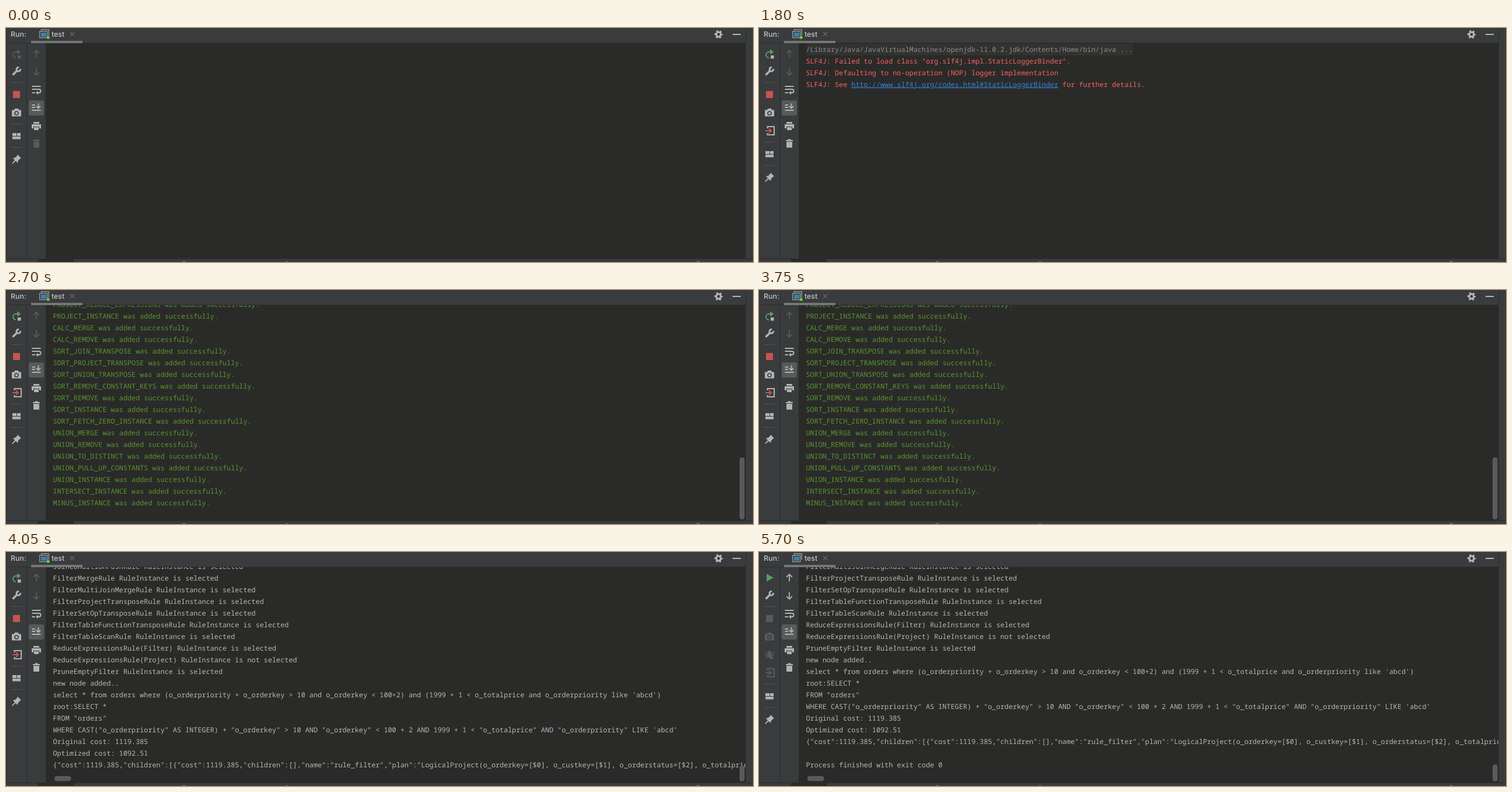
These frames come from a looping animation (1280x401 px, 6 s). An HTML page:

```html
<!DOCTYPE html>
<html lang="en">
<head>
<meta charset="utf-8">
<title>Run console</title>
<style>
  html, body { margin: 0; width: 100%; height: 100%; overflow: hidden; background: #2a2b29; }
  svg { display: block; width: 1280px; height: 401px; }
  text { text-rendering: geometricPrecision; }
  .ui { font: 500 12.4px Inter, "Open Sans", sans-serif; fill: #c3c4c4; }
  .log { font: 11.827px "Noto Sans Mono", "DejaVu Sans Mono", monospace; }
</style>
</head>
<body>
<svg viewBox="0 0 1280 401" xmlns="http://www.w3.org/2000/svg">
  <defs><clipPath id="view"><rect x="69" y="26" width="1198" height="369"/></clipPath></defs>
  <rect width="1280" height="401" fill="#2a2b29"/>
  <rect width="1280" height="25" fill="#393b3c"/>
  <rect y="26" width="68" height="369" fill="#393b3c"/>
  <rect x="1268" width="12" height="401" fill="#393b3c"/>
  <path d="M0 25.5H1267M35.5 26V395M1267.5 0V395M1 0V395" stroke="#2d2f2f" fill="none"/>
  <rect y="395" width="1280" height="6" fill="#393b3c"/>
  <path d="M0 395.5H1280" stroke="#2b2c2c"/>
  <rect x="55" y="396" width="61" height="5" fill="#292b2b"/>
  <path d="M302 401q3-2 6 0M479 401q2.500-1 5 0M1183 401q3-2 6 0" stroke="#8c8e8f" fill="none"/>
  <text class="ui" x="8" y="15.300">Run:</text>
  <text class="ui" x="78" y="15.300">test</text>
  <path d="M110 7l7 7m0-7l-7 7" stroke="#696c6d" stroke-width="1.200"/>
  <rect x="43" y="22" width="88" height="4" fill="#747778"/>
  <g fill="none" stroke="#92989b" stroke-width="1.400">
    <path d="M60.500 5V2.700H73.300V13"/>
    <rect x="57.700" y="5.700" width="13" height="11"/>
  </g>
  <rect x="60" y="8" width="9" height="7" fill="#3c82a4"/>
  <circle id="dot" cx="72.300" cy="16.300" r="2.500" fill="#5bd63d"/>
  <g transform="translate(1221 11)" fill="none" stroke="#b4b6b7">
    <circle r="3.900" stroke-width="3"/>
    <circle r="6" stroke-width="2.400" stroke-dasharray="3.142" stroke-dashoffset="1.570"/>
  </g>
  <path d="M1245 11H1259" stroke="#b4b6b7" stroke-width="2"/>
  <g id="tools"></g>
  <g id="console" clip-path="url(#view)"></g>
</svg>
<script>
const LOOP = 6000;
const C = {
  bar: '#393b3c', icon: '#b1b3b4', dim: '#585b5c', line: '#505354', thumb: '#595a59',
  red: '#c75450', green: '#599e5e', text: '#b5b6b5', error: '#f3625f', ok: '#5a932f', fold: '#8b8c8a', link: '#3482d8'
};
const byId = id => document.getElementById(id);
const escape = s => s.replace(/&/g, '&amp;').replace(/</g, '&lt;');
const rect = (x, y, w, h, fill, r = 0) =>
  `<rect x="${x}" y="${y}" width="${w}" height="${h}" rx="${r}" fill="${fill}"/>`;
const fill = (d, c) => `<path d="${d}" fill="${c}"/>`;
const stroke = (d, c, w = 1.8) => `<path d="${d}" fill="none" stroke="${c}" stroke-width="${w}"/>`;

// Icons are drawn around their centre.
const icons = {
  rerun: (c, c2) => stroke('M2-4H-1A5 5 0 0 0-1 6', c, 2) + fill('M1-8.500L7.500-4L1 .500z', c) + rect(2, 2, 5.5, 5.5, c2),
  play: c => fill('M-5-6.500L7 0L-5 6.500z', c),
  wrench: c => stroke('M-6.500 6.500L1-1', c, 3.6) + stroke('M4-6.300A3.300 3.300 0 1 0 6.500-3.800', c, 3),
  stop: c => rect(-6, -6, 12, 12, c),
  camera: c => rect(-8, -4.5, 16, 11, c, 1) + fill('M-4-4L-3-7H3L4-4z', c) +
    `<circle cy="1" r="3.800" fill="${C.bar}"/><circle cy="1" r="2.200" fill="${c}"/>`,
  exit: (c, c2) => stroke('M-4.500-4V-7H7V7H-4.500V4', c, 2) + stroke('M-8 0H2M-2-4L2 0L-2 4', c2, 2),
  bug: c => `<ellipse rx="3.800" ry="5.500" fill="${c}"/>` +
    stroke('M-3-7L0-4L3-7M-8-4L-4-2M8-4L4-2M-8 1H8M-7 6L-3 3', c, 1.5) + fill('M1 1L8 5L1 9z', c),
  layout: c => rect(-7, -5, 7, 5, c) + rect(1, -5, 6, 5, c) + rect(-7, 1, 14, 4.5, c),
  pin: c => fill('M2-8L8-2L6-1L3 2L2 6L-1.500 3L-7 8L-8 7L-3 1.500L-6-2L-2-3L1-6z', c),
  up: c => stroke('M0 6.500V-5.500M-4.800-1L0-5.800L4.800-1', c),
  down: c => stroke('M0-6.500V5.500M-4.800 1L0 5.800L4.800 1', c),
  wrap: c => stroke('M-7.500-6H7.500M-7.500-1H4.500A3 3 0 0 1 4.500 5H2M-7.500 5H-2', c, 2) + fill('M3 1.500V8.500L-1 5z', c),
  toEnd: c => stroke('M-7.500-4H-2M-7.500 0H-2M-7.500 5H7.500M3.500-7V1M0-2L3.500 1.500L7-2', c, 1.9),
  print: c => rect(-5, -7, 10, 3, c) + fill('M-8-3H8V4H5V1H-5V4H-8z', c) + rect(-4, 2, 8, 5, c),
  trash: c => fill('M-5-3H5V6Q5 7 4 7H-4Q-5 7-5 6zM-6-6H-2.500V-7.500H2.500V-6H6V-4H-6z', c)
};
const icon = (name, x, y, ...colors) => `<g transform="translate(${x} ${y})">${icons[name](...colors)}</g>`;

// Left tool column: the lower icons move down as process actions appear.
function tools(phase) {
  const idle = phase === 'start', done = phase === 'done';
  const active = done ? C.dim : C.icon;
  const nav = done ? C.icon : C.dim;
  const shift = { start: 0, running: 31, done: 62 }[phase];
  const separator = y => stroke(`M8 ${y + .5}H28`, C.line, 1);
  let s = done ? icon('play', 18, 44, C.green)
    : icon('rerun', 18, 45, idle ? C.dim : C.green, idle ? C.dim : C.icon);
  s += icon('wrench', 18, 74, C.icon) + separator(93);
  s += icon('stop', 18, 114, done ? C.dim : C.red) + icon('camera', 18, 145, active);
  if (done) s += icon('bug', 18, 176, C.dim);
  if (!idle) s += icon('exit', 19, done ? 207 : 176, active, done ? C.dim : C.red);
  s += separator(164 + shift) + icon('layout', 18, 185 + shift, C.icon);
  s += separator(204 + shift) + icon('pin', 18, 225 + shift, C.icon);
  s += icon('up', 52, 44, nav) + icon('down', 52, 75, nav) + icon('wrap', 52, 106, C.icon);
  s += rect(39, 124, 26, 26, '#575a5b', 3) + icon('toEnd', 52, 136, C.icon);
  return s + icon('print', 52, 168, C.icon) + icon('trash', 52, 198, idle ? C.dim : C.icon);
}

const startup = [
  '/Library/Java/JavaVirtualMachines/openjdk-11.0.2.jdk/Contents/Home/bin/java ...',
  'SLF4J: Failed to load class "org.slf4j.impl.StaticLoggerBinder".',
  'SLF4J: Defaulting to no-operation (NOP) logger implementation',
  'SLF4J: See http://www.slf4j.org/codes.html#StaticLoggerBinder for further details.'
];
const added = `JOIN_PROJECT_LEFT_TRANSPOSE JOIN_PROJECT_RIGHT_TRANSPOSE JOIN_LEFT_UNION_TRANSPOSE
  JOIN_RIGHT_UNION_TRANSPOSE SEMI_JOIN_REMOVE JOIN_REDUCE_EXPRESSIONS JOIN_LEFT_INSTANCE
  JOIN_RIGHT_INSTANCE PROJECT_CALC_MERGE PROJECT_CORRELATE_TRANSPOSE PROJECT_MERGE
  PROJECT_MULTI_JOIN_MERGE PROJECT_REMOVE PROJECT_TO_CALC PROJECT_SUB_QUERY_TO_CORRELATE
  PROJECT_REDUCE_EXPRESSIONS PROJECT_INSTANCE CALC_MERGE CALC_REMOVE SORT_JOIN_TRANSPOSE
  SORT_PROJECT_TRANSPOSE SORT_UNION_TRANSPOSE SORT_REMOVE_CONSTANT_KEYS SORT_REMOVE SORT_INSTANCE
  SORT_FETCH_ZERO_INSTANCE UNION_MERGE UNION_REMOVE UNION_TO_DISTINCT UNION_PULL_UP_CONSTANTS
  UNION_INSTANCE INTERSECT_INSTANCE MINUS_INSTANCE`.split(/\s+/).map(n => n + ' was added successfully.');
const selected = [...`JoinConditionPushRule FilterMergeRule FilterMultiJoinMergeRule FilterProjectTransposeRule
  FilterSetOpTransposeRule FilterTableFunctionTransposeRule FilterTableScanRule
  ReduceExpressionsRule(Filter) ReduceExpressionsRule(Project) PruneEmptyFilter`.split(/\s+/)
  .map(n => `${n} RuleInstance is ${n.includes('(Project)') ? 'not ' : ''}selected`), 'new node added..'];
const result = [
  ...selected,
  "select * from orders where (o_orderpriority + o_orderkey > 10 and o_orderkey < 100+2) and (1999 + 1 < o_totalprice and o_orderpriority like 'abcd')",
  'root:SELECT *',
  'FROM "orders"',
  `WHERE CAST("o_orderpriority" AS INTEGER) + "o_orderkey" > 10 AND "o_orderkey" < 100 + 2 AND 1999 + 1 < "o_totalprice" AND "o_orderpriority" LIKE 'abcd'`,
  'Original cost: 1119.385',
  'Optimized cost: 1092.51',
  '{"cost":1119.385,"children":[{"cost":1119.385,"children":[],"name":"rule_filter","plan":"LogicalProject(o_orderkey=[$0], o_custkey=[$1], o_orderstatus=[$2], o_totalprice=[$3], ',
  '',
  'Process finished with exit code 0'
];

// Lines are spaced 20 px apart; y is the middle of the first one.
const print = (lines, y, color) => lines.map((line, i) => {
  const body = escape(line).replace(/http:\S+/, url => `<tspan fill="${C.link}" text-decoration="underline">${url}</tspan>`);
  return `<text class="log" x="80.400" y="${y + 20 * i + 4.3}" fill="${color}">${body}</text>`;
}).join('');
const vThumb = (top, bottom) => rect(1257, top, 8.5, bottom - top, C.thumb, 4);
const hThumb = rect(83, 384, 28.5, 8.5, C.thumb, 4);
const command = rect(81, 27, 560, 20, '#323331') + print(startup.slice(0, 1), 36.5, C.fold);

const scenes = [
  [0, 'start', ''],
  [450, 'running', command],
  [1500, 'running', command + print(startup.slice(1), 56.5, C.error)],
  [2400, 'running', print(added.slice(0, 19), 30, C.ok) + vThumb(196, 302)],
  [2550, 'running', print(added.slice(15), 25, C.ok) + vThumb(287, 393)],
  [3900, 'running', print([...selected, ...selected].slice(-18), 25, C.text) + vThumb(363, 393)],
  [4050, 'running', print(result.slice(0, 18), 25, C.text) + vThumb(366, 393) + hThumb],
  [4950, 'running', print(result.slice(2), 25, C.text) + vThumb(364, 393) + hThumb],
  [5700, 'done', print(result.slice(2), 25, C.text) + vThumb(364, 393) + hThumb]
];

let shown;
function draw(time) {
  const scene = scenes.findLast(([start]) => start <= time);
  byId('dot').style.display = time < 4650 ? '' : 'none';
  if (scene === shown) return;
  shown = scene;
  byId('tools').innerHTML = tools(scene[1]);
  byId('console').innerHTML = scene[2];
}
function tick() {
  draw(performance.now() % LOOP);
  requestAnimationFrame(tick);
}
tick();
</script>
</body>
</html>
```
